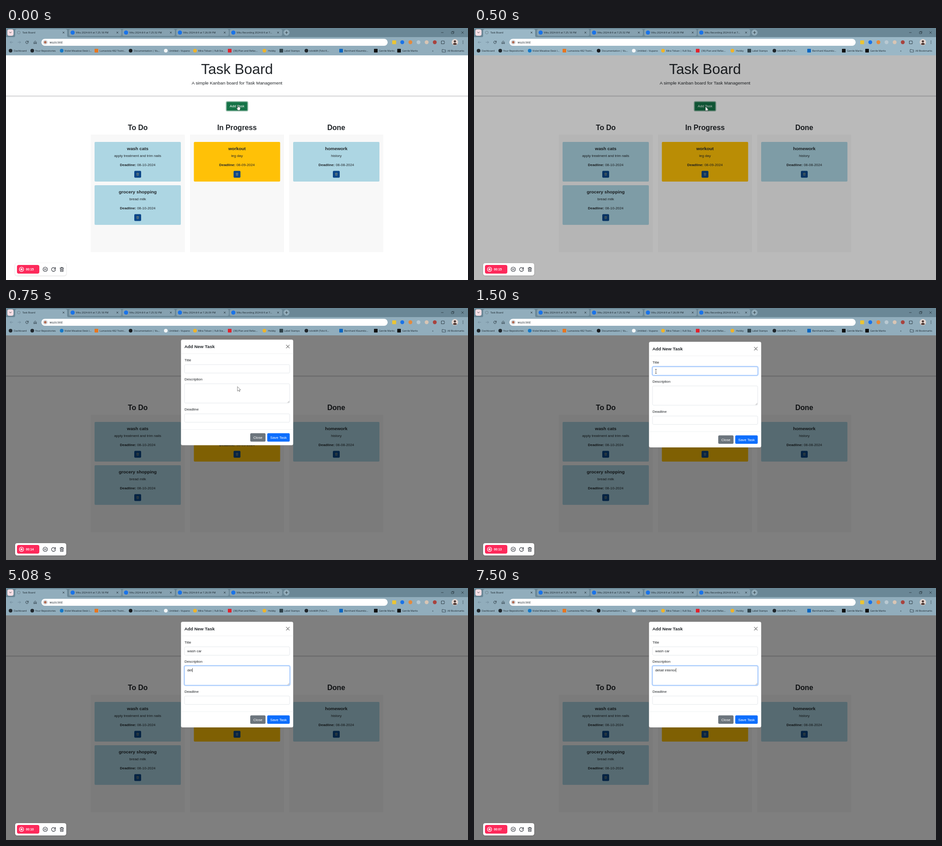
These frames come from a looping animation (1012 by 553 pixels, 8 s). An HTML page:

```html
<!DOCTYPE html>
<html lang="en">
<head>
<meta charset="utf-8">
<title>Task Board</title>
<style>
html, body { margin: 0; width: 100%; height: 100%; overflow: hidden; background: #fff; }
svg { display: block; width: 100vw; height: 100vh; }
text { font-family: "Liberation Sans", Arial, sans-serif; font-size: 7.87px; fill: #212529; white-space: pre; }
.ui text { font-family: "Open Sans", "Noto Sans", sans-serif; font-size: 5.5px; fill: #17222a; }
.mid { text-anchor: middle; }
.bold { font-weight: 700; }
.line { fill: none; stroke-linecap: round; stroke-linejoin: round; }
</style>
</head>
<body>
<svg id="stage" viewBox="0 0 1012 553" xmlns="http://www.w3.org/2000/svg">
  <rect width="1012" height="553" fill="#fff"/>
  <g id="page"></g>
  <rect id="shade" y="60" width="1012" height="493" fill="#000"/>
  <g id="modal"></g>
  <g id="chrome" class="ui"></g>
  <g id="recorder"></g>
  <g id="hand" transform="translate(504.5 168.5)">
    <path d="M2.6 7V1.6Q3.5 .2 4.4 1.6V5Q5.4 4.2 6 5.2Q7 4.6 7.4 5.6Q8.5 5.2 8.7 6.4V9L7.6 12H3.6L.6 8.2Q.8 6.6 2.6 7.8Z" fill="#fff" stroke="#222" stroke-width=".6"/>
  </g>
  <path id="arrow" d="M0 0V10L2.4 7.8L4 11L5.4 10.4L4 7.2H7Z" fill="#fff" stroke="#333" stroke-width=".6"/>
  <path id="beam" class="line" d="M-1.5 -4.5H1.5M0 -4.5V4.5M-1.5 4.5H1.5" stroke="#333" stroke-width=".7"/>
</svg>
<script>
const $ = id => document.getElementById(id);
const rect = (x, y, w, h, fill, r = 0, more = '') =>
  `<rect x="${x}" y="${y}" width="${w}" height="${h}" rx="${r}" fill="${fill}" ${more}/>`;
const dot = (x, y, r, fill, more = '') => `<circle cx="${x}" cy="${y}" r="${r}" fill="${fill}" ${more}/>`;
const line = (d, color, w = 1, more = '') =>
  `<path class="line" d="${d}" stroke="${color}" stroke-width="${w}" ${more}/>`;
const text = (x, y, str, cls = '', style = '') =>
  `<text x="${x}" y="${y}" class="${cls}" style="${style}">${str}</text>`;
const cross = (x, y, s, color, w) => line(`M${x - s} ${y - s}l${2 * s} ${2 * s}m0 ${-2 * s}l${-2 * s} ${2 * s}`, color, w);
const trash = (x, y, s, color, w) => line(
  'M-4 -3H4M-1.5 -3V-4.5H1.5V-3M-3.2 -3L-2.8 4.5H2.8L3.2 -3M-1 -.8V2.5M1 -.8V2.5',
  color, w, `transform="translate(${x} ${y}) scale(${s})"`);
const reload = (x, y, r, color, w) =>
  line(`M${x + r * .7} ${y - r * .7}A${r} ${r} 0 1 0 ${x + r} ${y + r * .2}M${x + r} ${y - r}v${r * .8}h${-r * .8}`, color, w);

function card(cx, y, title, note, date, fill) {
  return rect(cx - 94.5, y, 189, 87, fill, 2) +
    text(cx, y + 17.8, title, 'mid bold', 'font-size:9.84px') +
    text(cx, y + 33, note, 'mid') +
    text(cx, y + 52.6, `<tspan class="bold">Deadline:</tspan> ${date}`, 'mid') +
    rect(cx - 7.5, y + 63.5, 15, 15, '#0b4688', 2) +
    trash(cx, y + 71, .62, '#8a8f78', 1.1);
}

function buildPage() {
  const blue = '#add6e3';
  const columns = ['To Do', 'In Progress', 'Done'].map((name, i) => {
    const cx = 288.7 + i * 217.3;
    return rect(cx - 103, 234, 206, 258, '#f8f8f8') +
      text(cx, 224, name, 'mid bold', 'font-size:15.74px');
  });
  $('page').innerHTML =
    text(506, 101.4, 'Task Board', 'mid', 'font-size:31.5px') +
    text(506, 124, 'A simple Kanban board for Task Management', 'mid', 'font-size:9.84px') +
    rect(0, 148.3, 1012, 2.2, '#d6d6d8') +
    rect(482.5, 161.5, 47, 20.5, '#157347', 2.5, 'stroke="#8eb9a5" stroke-width="2"') +
    text(506, 174.3, 'Add Task', 'mid', 'fill:#fff') +
    columns.join('') +
    card(288.5, 250, 'wash cats', 'apply treatment and trim nails', '08-10-2024', blue) +
    card(288.5, 345, 'grocery shopping', 'bread milk', '08-10-2024', blue) +
    card(506, 250, 'workout', 'leg day', '08-09-2024', '#ffc107') +
    card(723.5, 250, 'homework', 'history', '08-08-2024', blue);
}

function field(id, label, y, h) {
  return text(391, y - 7.2, label) +
    rect(391, y, 230.5, h, '#fff', 2.5, 'stroke="#dee2e6" stroke-width=".8"') +
    `<g id="${id}Ring">` +
    rect(390, y - 1, 232.5, h + 2, 'none', 3.5, 'stroke="#c2dbfe" stroke-width="2"') +
    rect(391, y, 230.5, h, 'none', 2.5, 'stroke="#86b7fe" stroke-width=".8"') + '</g>' +
    text(397, y + 11.7, `<tspan id="${id}Text"></tspan>`) +
    rect(0, y + 4.6, .7, 9, '#222', 0, `id="${id}Caret"`);
}

function buildModal() {
  $('modal').innerHTML =
    rect(383.2, 74, 246, 232, '#fff', 3.5, 'stroke="#000" stroke-opacity=".18" stroke-width=".6"') +
    text(390.7, 92.5, 'Add New Task', 'bold', 'font-size:9.84px') +
    cross(617.3, 89.3, 3.4, '#6f6f6f', 1.1) +
    line('M383.5 105H629M383.5 271.3H629', '#e4e7ea', .6) +
    field('title', 'Title', 129, 18.5) +
    field('note', 'Description', 171, 42.3) +
    line('M617 212.3l3.3 -3.3M619 212.3l1.3 -1.3', '#777', .6) +
    text(391, 229.8, 'Deadline') +
    rect(391, 237, 230.5, 18.5, '#fff', 2.5, 'stroke="#dee2e6" stroke-width=".8"') +
    rect(535, 279.5, 33.5, 18.6, '#6c757d', 2.5) + text(551.7, 291.6, 'Close', 'mid', 'fill:#fff') +
    rect(572.2, 279.5, 49.3, 18.6, '#0d6efd', 2.5) + text(596.8, 291.6, 'Save Task', 'mid', 'fill:#fff');
}

function buildChrome() {
  const ink = '#26343d', bar = '#91adbc';
  const tabs = [
    [138, 'Viltu 2024-8-9 at 7.25.18 PM'], [255, 'Viltu 2024-8-9 at 7.25.52 PM'],
    [373, 'Viltu 2024-8-9 at 7.26.09 PM'], [490, 'Viltu Recording 2024-8-9 at 7...']
  ].map(([x, name]) => rect(x, 2.5, 115, 15, '#86a1b0', 4) +
    dot(x + 8, 10, 4.6, '#1a73e8') + text(x + 15, 12.2, name) + cross(x + 106, 10, 1.7, ink, .8));
  const marks = [
    [10, '#20262b', 'Dashboard', 17], [57.5, '#20262b', 'Your Repositories', 64],
    [122, '#1479c9', 'Violet Meadow Desk I...', 128], [198, '#e8761f', 'Lumavista 482 Traini...', 205],
    [273, '#17191c', 'Documentation | Vu...', 280], [350, '#f5f7f8', 'Untitled – Vupano', 357],
    [414, '#f0b429', 'Mira Tolvan | Full-Sta...', 421], [490, '#e3222b', '(36) Plan and Refac...', 498],
    [566, '#f0b429', 'Hobby', 574], [603, '#2f4048', 'Label Stamps', 609],
    [658, '#20262b', 'tolvik84 (Tolvi K...', 664], [734, '#0a66c2', 'Bernhard Klaumitz...', 741],
    [810, '#111', 'Gentle Marks', 817], [861, '#111', 'Gentle Marks', 868]
  ].map(([x, fill, name, tx], i) =>
    ([3, 7, 9, 11, 12, 13].includes(i) ? rect(x - 4, 45.8, 8, 8, fill, .8) : dot(x, 49.8, 4, fill)) +
    text(tx, 51.9, name));
  const tools = ['#1a73e8', '#e58a3c', '#b9c9d2', '#d8c5b4', '#a8433f']
    .map((fill, i) => dot(868 + i * 17.8, 31.3, 4.2, fill));
  $('chrome').innerHTML =
    rect(0, 0, 1012, 20, '#6a8796') +
    rect(0, 20, 1012, 40, bar, 0, 'id="bar"') +
    `<path id="tab" d="M17 20Q20 20 20 17V6Q20 2.5 24 2.5H130Q134 2.5 134 6V17Q134 20 137 20Z" fill="${bar}"/>` +
    rect(3, 3, 13.5, 14, '#f7dfe5', 4) + line('M7.8 9L9.7 11L11.6 9', ink, .9) +
    dot(28, 10, 3.2, 'none', 'stroke="#71858f" stroke-width="1"') +
    text(36, 12.2, 'Task Board') + cross(126, 10, 1.7, ink, .8) + tabs.join('') +
    dot(614.5, 10, 6.5, '#93aebc') + line('M611.8 10h5.4M614.5 7.3v5.4', ink, .9) +
    line('M953.5 10h4.5', ink, .8) + line('M976 8.6h4v4h-4zM977.2 8.6v-1.2h4v4h-1.2', ink, .7) +
    cross(1000, 10, 2.2, ink, .8) +
    line('M15 31.3H9M11.5 28.8L9 31.3L11.5 33.8M26 31.3H32M29.5 28.8L32 31.3L29.5 33.8', '#71899a', .9) +
    reload(46, 31.3, 2.9, ink, .9) +
    line('M61.3 31L64 28.4L66.7 31V34.4H65V32H63V34.4H61.3Z', ink, .8) +
    rect(77.5, 23.7, 758.5, 15.3, '#fff', 7.6) + dot(86, 31.3, 5.4, '#d9dee2') +
    dot(86, 31.3, 2.7, '#b06a52') + text(95.5, 33.7, 'wuzo.test', '', 'font-size:6.4px') +
    rect(846, 27.3, 8.5, 8.2, '#ecc531', 1) + tools.join('') +
    line('M954 28.6h1.8q.8 -2 1.9 0h2.3v2q1.6 .9 0 1.9v2.2h-6z', ink, .9) +
    dot(983.3, 31.3, 7, '#e3d6d0') + dot(983.3, 29.3, 2.4, '#4a3531') +
    '<path d="M978.6 35.5Q983.3 29.5 988 35.5Q983.3 39 978.6 35.5Z" fill="#4a3531"/>' +
    [28.6, 31.3, 34].map(y => dot(1001, y, .75, ink)).join('') +
    marks.join('') + text(933.5, 51.6, '»') +
    line('M955.7 47.2h2.6l1 1h3.6v4.6h-7.2z', ink, .8) + text(967, 51.9, 'All Bookmarks');
}

function buildRecorder() {
  const ink = '#2c3038';
  $('recorder').innerHTML =
    rect(18.5, 515.5, 115, 30, '#000', 6, 'opacity=".04"') +
    rect(19.3, 515.4, 113.4, 28.8, '#000', 5, 'opacity=".05"') +
    rect(20, 516, 112, 27, '#fff', 4.5) +
    rect(24, 520, 49, 19, '#fd2a5b', 4) +
    dot(34, 529.5, 4.6, 'none', 'stroke="#fff" stroke-width="1.4"') + rect(32, 527.5, 4, 4, '#fff', .6) +
    text(43.5, 532, '', 'bold', 'fill:#fff;font-size:6.8px').replace('<text', '<text id="clock"') +
    dot(86, 529.5, 4.8, 'none', `stroke="${ink}" stroke-width="1.1"`) +
    line('M84.6 527.8v3.4M87.4 527.8v3.4', ink, 1.1) +
    reload(104, 529.7, 4.3, ink, 1.2) + trash(122.2, 529.7, 1, ink, 1.1);
}

const clamp = v => Math.max(0, Math.min(1, v));
const progress = (t, start, length) => clamp((t - start) / length);

// cubic-bezier(0, 0, .58, 1)
function easeOut(x) {
  let lo = 0, hi = 1;
  for (let i = 0; i < 20; i++) {
    const s = (lo + hi) / 2;
    if (1.74 * s * s * (1 - s) + s ** 3 < x) lo = s; else hi = s;
  }
  return x >= 1 ? 1 : 3 * lo * lo - 2 * lo ** 3;
}

// Moments at which each key lands
const titleKeys = [1920, 2170, 2250, 2420, 2580, 2670, 2750, 2920];
const noteKeys = [4670, 4920, 5080, 5250, 5330, 5500, 6000, 6420, 6580, 6830, 6920, 7000, 7250, 7420, 7500];
const typed = (str, keys, t) => str.slice(0, keys.filter(k => k <= t).length);
const show = (id, on) => $(id).setAttribute('opacity', +on);

const ctx = document.createElement('canvas').getContext('2d');
ctx.font = '78.7px "Liberation Sans", Arial, sans-serif';

function setField(id, str, caretOn, ring) {
  $(id + 'Text').textContent = str;
  $(id + 'Caret').setAttribute('x', 397 + ctx.measureText(str).width / 10);
  show(id + 'Caret', caretOn);
  show(id + 'Ring', ring);
}

function render(t) {
  const between = (a, b) => t >= a && t < b;
  show('shade', progress(t, 420, 150) * .5);
  show('modal', progress(t, 564, 150));
  $('modal').setAttribute('transform', `translate(0 ${-24.6 * (1 - easeOut(progress(t, 564, 300)))})`);

  const barColor = between(420, 580) ? '#9ab7c6' : '#91adbc';
  $('bar').setAttribute('fill', barColor);
  $('tab').setAttribute('fill', barColor);

  const swap = t < 3750 ? 0 : t < 4250 ? .5 : 1;
  setField('title', typed('wash car', titleKeys, t),
    between(1080, 1460) || between(1920, 3540), progress(t, 1020, 150) * (1 - swap));
  setField('note', typed('detail interior', noteKeys, t),
    between(3750, 4250) || t >= 4670, swap);

  const move = easeOut(progress(t, 755, 300));
  const x = 507 - 108.5 * move, y = 172.5 - 33.5 * move;
  $('arrow').setAttribute('transform', `translate(${x} ${y})`);
  $('beam').setAttribute('transform', `translate(${x} ${y})`);
  show('hand', t < 420);
  show('arrow', between(420, 1000));
  show('beam', between(1000, 2170));

  const left = t < 560 ? 15 : 15 - Math.floor((t + 505) / 1000);
  $('clock').textContent = '00:' + String(left).padStart(2, '0');
}

buildPage();
buildModal();
buildChrome();
buildRecorder();

const start = performance.now();
function tick() {
  render((performance.now() - start) % 8000);
  requestAnimationFrame(tick);
}
tick();
</script>
</body>
</html>
```
